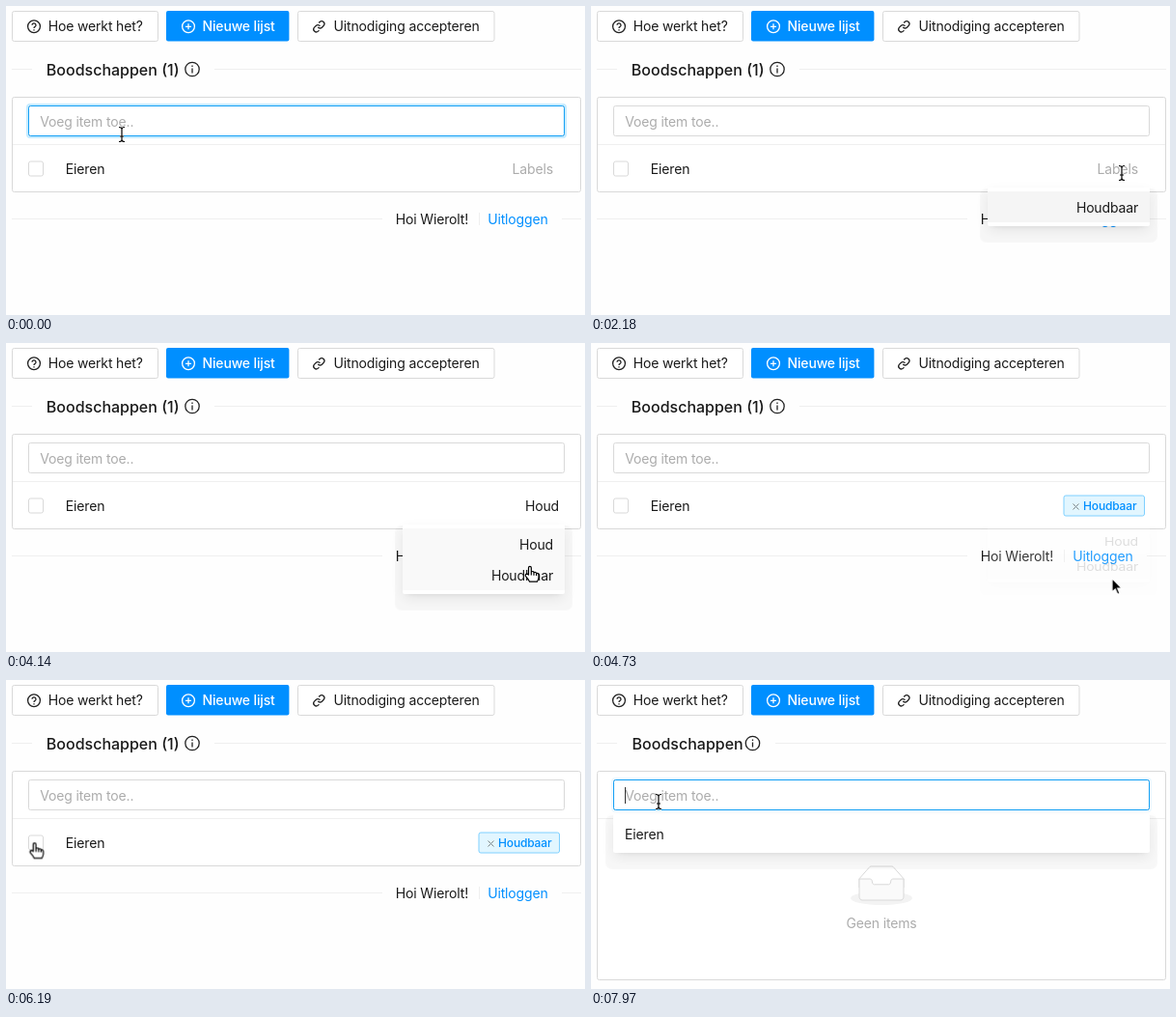
Write an HTML page that moves like this. It is 600 px wide and 320 px high and loops after 8000 ms.

```html
<!DOCTYPE html>
<html lang="nl">
<head>
<meta charset="utf-8">
<title>Boodschappen</title>
<style>
  html, body { margin: 0; width: 100%; height: 100%; overflow: hidden; background: #fefefe; }
  body { position: relative; font: 14px/33px Inter, "Open Sans", sans-serif; letter-spacing: -.011em; color: #1a1a1a; }
  svg { position: absolute; left: 0; top: 0; width: 600px; height: 320px; }
  text { fill: #1a1a1a; white-space: pre; }
  .hint { fill: #acacac; }
  .title { font-size: 16px; font-weight: 500; letter-spacing: 0; }
  .blue { fill: #008fff; }
  .box { fill: #fff; stroke: #d9d9d9; }
  .rule { stroke: #efefef; fill: none; }
  .icon { fill: none; stroke: #222; stroke-width: 1.3; }
  .caret { stroke: #333; }

  /* One loop is 8000 ms, so 1% is 80 ms. */
  .anim { animation: 8s step-end infinite; }
  .smooth { animation: 8s linear infinite; }

  .filled { animation-name: filled; }
  .empty { animation-name: empty; }
  @keyframes filled { 0% { opacity: 1 } 87%, 100% { opacity: 0 } }
  @keyframes empty { 0% { opacity: 0 } 87%, 100% { opacity: 1 } }

  .focus { animation-name: focus; }
  .glow { animation-name: glow; }
  @keyframes focus { 0%, 21.25% { opacity: 1 } 23.5%, 97.25% { opacity: 0 } 98.75%, 100% { opacity: 1 } }
  @keyframes glow { 0%, 21.25% { opacity: 1 } 23.5%, 97.25% { opacity: 0 } 100% { opacity: .35 } }
  .itemCaret { animation-name: itemCaret; }
  @keyframes itemCaret { 0% { opacity: 0 } 97.5%, 100% { opacity: 1 } }

  .labels { animation-name: labels; }
  .typed { animation-name: typed; }
  .tag { animation-name: tag; }
  .labelCaret { animation-name: labelCaret; }
  @keyframes labels { 0% { opacity: 1 } 31%, 100% { opacity: 0 } }
  @keyframes typed { 0% { opacity: 0 } 31% { opacity: 1 } 57.75%, 100% { opacity: 0 } }
  @keyframes tag { 0% { opacity: 0 } 57.75%, 100% { opacity: 1 } }
  @keyframes labelCaret {
    0% { opacity: 0 } 20.5% { opacity: 1 } 27.25% { opacity: 0 } 30.25% { opacity: 1 }
    48.4% { opacity: 0 } 54.6% { opacity: 1 } 57%, 100% { opacity: 0 }
  }

  /* Letters have no size until they are typed. */
  .k2 { animation-name: key2; }
  .k3 { animation-name: key3; }
  .k4 { animation-name: key4; }
  @keyframes key2 { 0% { font-size: 0 } 38.375%, 100% { font-size: 14px } }
  @keyframes key3 { 0% { font-size: 0 } 40.625%, 100% { font-size: 14px } }
  @keyframes key4 { 0% { font-size: 0 } 42.125%, 100% { font-size: 14px } }

  .menu {
    position: absolute; padding: 4px 0; background: #fff; border-radius: 2px; transform-origin: 0 0;
    box-shadow: 0 3px 6px -4px rgba(0,0,0,.12), 0 5px 14px rgba(0,0,0,.07), 0 9px 1px 8px rgba(0,0,0,.03);
  }
  .row { height: 32px; padding: 0 12px; overflow: hidden; }
  .labelMenu { left: 411px; top: 188px; width: 168px; text-align: right; animation-name: labelMenu; }
  .itemMenu { left: 23px; top: 139px; width: 556px; animation-name: itemMenu; }
  @keyframes labelMenu {
    0%, 21.25% { opacity: 0; transform: scaleY(.8) }
    23.5%, 57% { opacity: 1; transform: none }
    59.5%, 100% { opacity: 0; transform: scaleY(.8) }
  }
  @keyframes itemMenu {
    0%, 97.25% { opacity: 0; transform: scaleY(.8) }
    99.4%, 100% { opacity: 1; transform: none }
  }
  .newRow { animation: 8s step-end infinite grow, 8s linear infinite leave; }
  .oldRow { animation-name: enter; }
  @keyframes grow { 0% { height: 0 } 31.75%, 100% { height: 32px } }
  @keyframes leave { 0%, 50% { background: #f3f3f3 } 53.5%, 100% { background: #fff } }
  @keyframes enter {
    0%, 31.7% { background: #f5f5f5 } 31.75%, 50% { background: #fff } 53.5%, 100% { background: #f3f3f3 }
  }

  .check { animation-name: check; }
  @keyframes check { 0%, 78.5% { opacity: 0 } 80.25%, 100% { opacity: 1 } }

  .pointer { animation: 8s ease-in-out infinite move; }
  @keyframes move {
    0%, .75% { transform: translate(120px, 133px) }
    3.625%, 6.625% { transform: translate(109px, 118px) }
    12.5%, 14.625% { transform: translate(476px, 146px) }
    18.125%, 48.125% { transform: translate(550px, 173px) }
    51.75% { transform: translate(543px, 232px) }
    54.75%, 58.75% { transform: translate(541px, 243px) }
    66.375% { transform: translate(300px, 218px) }
    67.875%, 68.375% { transform: translate(301px, 219px) }
    69.25%, 71.5% { transform: translate(123px, 192px) }
    78%, 92.25% { transform: translate(28px, 169px) }
    96.25%, 100% { transform: translate(70px, 126px) }
  }
  .beam { animation-name: beam; }
  .arrow { animation-name: arrow; }
  .hand { animation-name: hand; }
  @keyframes beam {
    0% { opacity: 1 } 9.5% { opacity: 0 } 15.9% { opacity: 1 } 50.1% { opacity: 0 } 94.9%, 100% { opacity: 1 }
  }
  @keyframes arrow {
    0% { opacity: 0 } 9.5% { opacity: 1 } 15.9% { opacity: 0 } 57.75% { opacity: 1 }
    76.9% { opacity: 0 } 87% { opacity: 1 } 94.9%, 100% { opacity: 0 }
  }
  @keyframes hand {
    0% { opacity: 0 } 50.1% { opacity: 1 } 57.75% { opacity: 0 } 76.9% { opacity: 1 } 87%, 100% { opacity: 0 }
  }
</style>
</head>
<body>
<svg viewBox="0 0 600 320">
  <defs>
    <g id="info" class="icon"><circle r="7.2"/><path d="M0-1V4M0-4v1.6"/></g>
    <path id="beamShape" fill="none" d="M-3-7.5Q0-7.5 0-5.5Q0-7.5 3-7.5M0-5.5V5.5M-3 7.5Q0 7.5 0 5.5Q0 7.5 3 7.5M-2 2H2"/>
  </defs>

  <rect class="box" x="6.5" y="5.5" width="151" height="31" rx="2"/>
  <rect class="blue" x="166" y="5" width="127.4" height="31.6" rx="2"/>
  <rect class="box" x="302.5" y="5.5" width="203.5" height="31" rx="2"/>
  <g class="icon">
    <circle cx="29" cy="21.3" r="6.4"/>
    <path d="M27 19.8a2 2 0 1 1 2.9 1.8q-.9.5-.9 1.4M29 24.2v1.2"/>
    <path stroke="#fff" d="M182.6 21.3a6.4 6.4 0 1 0 12.8 0a6.4 6.4 0 1 0-12.8 0M186 21.3h6M189 18.3v6"/>
    <g transform="translate(317.6 14.6) scale(.56)" style="stroke-width:2.3">
      <path d="M10 13a5 5 0 0 0 7.54.54l3-3a5 5 0 0 0-7.07-7.07l-1.72 1.71M14 11a5 5 0 0 0-7.54-.54l-3 3a5 5 0 0 0 7.07 7.07l1.71-1.71"/>
    </g>
  </g>
  <text x="43.7" y="26.3">Hoe werkt het?</text>
  <text x="203.5" y="26.3" style="fill:#fff;font-weight:500">Nieuwe lijst</text>
  <text x="339.5" y="26.3">Uitnodiging accepteren</text>

  <g class="anim filled">
    <path class="rule" d="M6 65.5H27M216 65.5H596M6 220.5H390M576 220.5H596M490.5 214V227"/>
    <text class="title" x="41.8" y="71.5">Boodschappen (1)</text>
    <use href="#info" x="193" y="65.5"/>
    <rect class="box" x="6.5" y="94.5" width="589" height="98" rx="2"/>
    <rect class="box" x="23.5" y="161" width="15" height="15" rx="2"/>
    <g class="smooth check">
      <rect class="blue" x="23" y="160.5" width="16" height="16" rx="2"/>
      <path d="M27 168.5l3 3 5-6" fill="none" stroke="#fff" stroke-width="2"/>
    </g>
    <text x="61.8" y="173.7">Eieren</text>
    <text class="hint anim labels" x="524.5" y="173.7">Labels</text>
    <text class="anim typed" x="573" y="173.7" text-anchor="end">H<tspan class="anim k2">o</tspan><tspan class="anim k3">u</tspan><tspan class="anim k4">d</tspan></text>
    <path class="caret anim labelCaret" d="M572.5 160V177"/>
    <g class="anim tag">
      <rect x="490" y="158" width="83.5" height="21" rx="2" fill="#e2f6ff" stroke="#7fd0ff"/>
      <path d="M499.5 166.5l6 6m0-6l-6 6" stroke="#7d868c"/>
      <text class="blue" x="510" y="173.3" style="font-size:12px;font-weight:500">Houdbaar</text>
    </g>
    <text x="403.8" y="225.7">Hoi Wierolt!</text>
    <text class="blue" x="499.2" y="225.7">Uitloggen</text>
  </g>

  <g class="anim empty">
    <path class="rule" d="M6 65.5H27M191 65.5H596"/>
    <text class="title" x="42.6" y="71.5">Boodschappen</text>
    <use href="#info" x="167.5" y="65.5"/>
    <rect class="box" x="6.5" y="94.5" width="589" height="216" rx="2"/>
    <g transform="translate(269 193)" stroke="#d9d9d9">
      <ellipse cx="32" cy="33" rx="32" ry="7" fill="#f3f3f3" stroke="none"/>
      <path fill="#fff" d="M55 12.8L44.9 1.3Q44 0 42.9 0H21.1Q20 0 19.1 1.3L9 12.8V22H55z"/>
      <path fill="#fafafa" d="M41.6 15.9c0-1.6 1-2.9 2.2-2.9H55v18.1c0 2.2-1.3 3.9-3 3.9H12c-1.7 0-3-1.7-3-3.9V13h11.2c1.2 0 2.2 1.3 2.2 2.9s1 2.9 2.2 2.9h14.8c1.2 0 2.2-1.3 2.2-2.9z"/>
    </g>
    <text class="hint" x="301" y="256.5" text-anchor="middle">Geen items</text>
  </g>

  <path class="rule" d="M7 143.5H595"/>
  <rect class="smooth glow" x="22" y="102" width="558" height="34" rx="3" fill="none" stroke="#c5ebff" stroke-width="2"/>
  <rect class="box" x="23.5" y="103.5" width="555" height="31" rx="2"/>
  <rect class="smooth focus" x="23.5" y="103.5" width="555" height="31" rx="2" fill="none" stroke="#14a0f5"/>
  <text class="hint" x="35.3" y="124.5">Voeg item toe..</text>
  <path class="caret anim itemCaret" d="M35.5 111V128"/>
</svg>

<div class="menu smooth labelMenu">
  <div class="row newRow">H<span class="anim k2">o</span><span class="anim k3">u</span><span class="anim k4">d</span></div>
  <div class="row smooth oldRow">Houdbaar</div>
</div>
<div class="menu smooth itemMenu"><div class="row">Eieren</div></div>

<svg viewBox="0 0 600 320">
  <g class="pointer">
    <g class="anim beam">
      <use href="#beamShape" stroke="#fff" stroke-width="2.6"/>
      <use href="#beamShape" stroke="#000" stroke-width="1.2"/>
    </g>
    <path class="anim arrow" d="M0 .5V15.3L3.4 12.1L5.8 17.5L8.3 16.4L6 11.2H10.6Z" stroke="#fff" stroke-width="1.4" fill="#000"/>
    <path class="anim hand" fill="#fff" stroke="#000" stroke-width="1.2" stroke-linejoin="round"
      d="M-1.5 8V.8Q-1.5-.6-.1-.6T1.3.8V5Q3.6 3.8 4 5.6Q6.2 4.8 6.6 6.6Q9 6 9 8.2V11Q8.6 13 7.4 15.2H-.4Q-1.6 12.6-4.6 9.4Q-5.2 7.4-3.4 7.2Q-2.4 7.2-1.5 8ZM1.3 5V8.5M4 5.6V8.7M6.6 6.6V9"/>
  </g>
</svg>
</body>
</html>
```
